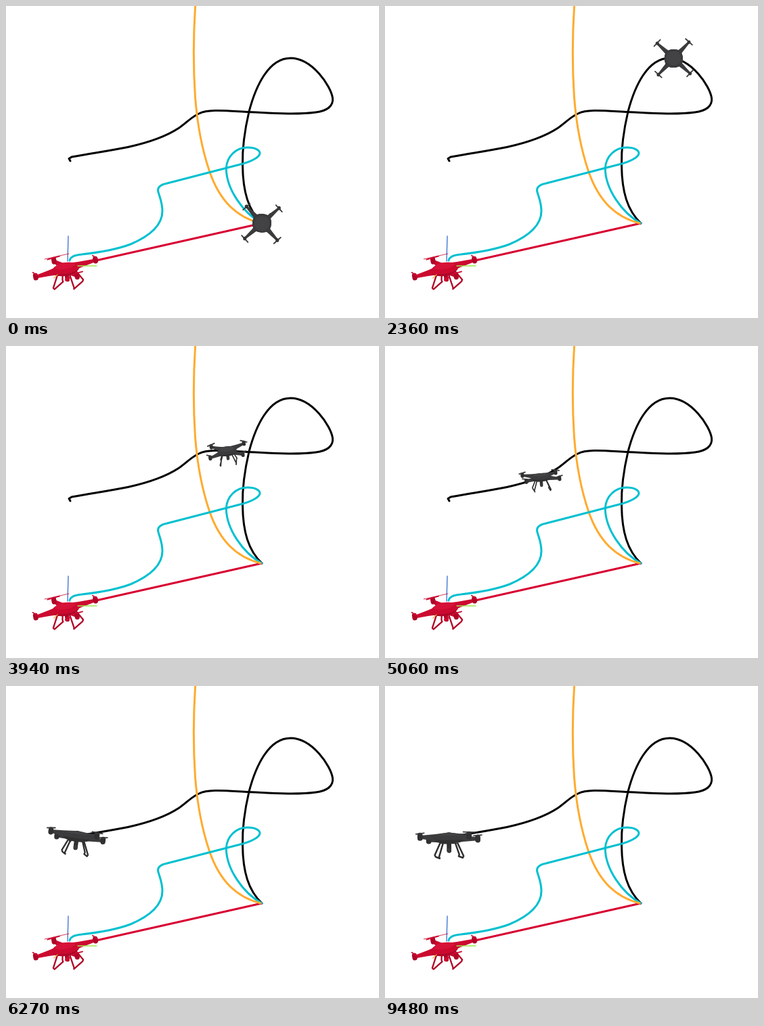
An HTML page with a canvas for the animation above (9.51 s loop, 551 by 461 pixels).

```html
<!DOCTYPE html>
<html lang="en">
<head>
<meta charset="utf-8">
<title>Drone flight paths</title>
<style>
  html, body { margin: 0; width: 100%; height: 100%; overflow: hidden; background: #fff; }
  canvas { display: block; width: 551px; height: 461px; }
</style>
</head>
<body>
<canvas id="stage" width="551" height="461"></canvas>
<script>
const g = document.getElementById('stage').getContext('2d');
const LOOP = 9510, RAD = Math.PI / 180;

const flight = 'M378 321C358 302 350 275 349.5 235C349 212 352 186 359 156' +
  'C369 118 388 77 420.5 77C452 77 480 118 482.5 136C484 148 474 155 458 157' +
  'C428 161 390 158 359 156.5C326 155 299 152 285 159C274 164 267 172 255 180.5' +
  'C236 193 214 201 180 208.5C150 214.5 130 217 97 223L93 225.5L95 229';
const black = new Path2D(flight);
const orange = new Path2D('M279.6 0C277 40 276.5 90 279.5 135C283 180 290 213 300.5 244C316 289 341 312 376 321');
const red = new Path2D('M120 379L378 321');
const tealTail = new Path2D('M378 321C350 306 325.500 270 325.300 240');
const tealFront = new Path2D('M325.300 240C326 222 340 209 357 209C368 209 375 213 375 217.5' +
  'C375 223 364 229 350 233L238 262C228 264 223 268 225 275' +
  'C227 282 231 291 231 303C231 328 205 343 184 352C160 361 130 365 112 367C100 368 95 371 94 376');

const line = document.createElementNS('http://www.w3.org/2000/svg', 'path');
line.setAttribute('d', flight);

// time, distance flown, yaw, view elevation, roll (degrees), arm length
const keys = [
  [1360, 0, 48, 100, 0, 34],
  [1790, 106, 33, 105, 0, 32],
  [2315, 277, 42, 85, 0, 33],
  [3030, 382, 61, 38, -12, 36],
  [4255, 581, 45, 16, -6, 34],
  [5060, 646, 39, 11, -4, 35],
  [6270, 775, 37, 5, 7, 49],
  [7100, 786, 35, 4, -1, 52]
];

// monotone cubic interpolation, at rest at both ends
function slope(i, c) {
  if (i === 0 || i === keys.length - 1) return 0;
  const rate = j => (keys[j + 1][c] - keys[j][c]) / (keys[j + 1][0] - keys[j][0]);
  const a = rate(i - 1), b = rate(i);
  return a * b <= 0 ? 0 : 2 * a * b / (a + b);
}

function poseAt(t) {
  const i = Math.max(0, keys.findLastIndex((k, n) => k[0] <= t && n < keys.length - 1));
  const p = keys[i], q = keys[i + 1], h = q[0] - p[0];
  const u = Math.min(1, Math.max(0, (t - p[0]) / h)), w = 1 - u;
  return p.map((v, c) =>
    v * (1 + 2 * u) * w * w + slope(i, c) * h * u * w * w +
    q[c] * u * u * (3 - 2 * u) - slope(i + 1, c) * h * u * u * w).slice(1);
}

function stroke(path, color) {
  g.strokeStyle = color;
  g.lineWidth = 3;
  g.stroke(path);
}

function poly(points, color, width) {
  g.strokeStyle = color;
  g.lineWidth = width;
  g.beginPath();
  points.forEach(p => g.lineTo(p[0], p[1]));
  g.stroke();
}

function arm([x, y], size, color) {
  const len = Math.hypot(x, y) || 1, nx = -y / len * size, ny = x / len * size;
  const side = (k, s) => [x * k + nx * s, y * k + ny * s];
  g.fillStyle = color;
  g.beginPath();
  g.moveTo(...side(0, 0.16));
  g.quadraticCurveTo(...side(0.5, 0.08), ...side(1, 0.045));
  g.lineTo(...side(1, -0.045));
  g.quadraticCurveTo(...side(0.5, -0.08), ...side(0, -0.16));
  g.fill();
}

function drone(x, y, [yaw, tilt, roll, size], [dark, base, light]) {
  const sin = Math.sin(tilt * RAD), cos = Math.cos(tilt * RAD);
  // point at quarter turn i, radius r (in arm lengths), depth z below the arms
  const at = (i, r, z = 0) => {
    const a = (yaw + i * 90) * RAD;
    return [r * Math.cos(a) * size, (r * Math.sin(a) * sin + z * cos) * size];
  };
  const corners = [0, 1, 2, 3];
  g.save();
  g.translate(x, y);
  g.rotate(roll * RAD);

  for (const [a, b] of [[1, 2], [0, 3]]) {
    poly([at(a, 0.3, 0.14), at(a, 0.5, 0.5), at(a, 0.47, 0.55),
      at(b, 0.47, 0.55), at(b, 0.5, 0.5), at(b, 0.3, 0.14)], dark, size * 0.048);
  }
  poly([at(0, 0, 0.15), at(0, 0, 0.36)], dark, size * 0.13);
  poly([at(0.5, 0.07, 0.34), at(2.5, 0.07, 0.34)], base, size * 0.1);

  for (const i of corners) {
    const [hx, hy] = at(i, 1, -0.1), [bx, by] = at(i + 1, 0.2);
    arm(at(i, 1), size, base);
    poly([at(i, 1, -0.05), at(i, 1, 0.03)], dark, size * 0.15);
    poly([[hx - bx, hy - by], [hx + bx, hy + by]], base, 1.8);
  }

  // rounded hull, stacked from the belly to the roof
  for (let z = 0.15; z > -0.13; z -= 0.03) {
    const r = 0.58 * Math.sqrt(1 - ((z - 0.02) / 0.17) ** 2);
    g.fillStyle = z > 0.05 ? dark : z > -0.07 ? base : light;
    g.beginPath();
    g.moveTo(...at(-0.5, r * 0.71, z));
    for (const i of corners) g.quadraticCurveTo(...at(i, r, z), ...at(i + 0.5, r * 0.71, z));
    g.fill();
  }
  g.restore();
}

const grey = ['#303031', '#3b3b3d', '#434345'];
const crimson = ['#b00628', '#cc0a30', '#d61238'];
const parked = [72, 18, -10, 48];

function draw() {
  const t = (performance.now() - start) % LOOP;
  g.fillStyle = '#fff';
  g.fillRect(0, 0, 551, 461);
  g.lineCap = g.lineJoin = 'round';

  stroke(black, '#000');
  stroke(red, '#d80032');
  stroke(tealTail, '#00c0d0');
  stroke(orange, '#ffab2e');

  const [distance, ...pose] = poseAt(t);
  const p = line.getPointAtLength(distance);
  drone(p.x, p.y, pose, grey);

  stroke(tealFront, '#00c0d0');
  poly([[92, 340], [91, 377]], '#3a6fd0', 1.3);
  drone(88, 388, parked, crimson);
  poly([[57, 374], [93, 366]], crimson[1], 0.8);
  poly([[106, 384], [134, 384]], '#9bea4c', 1.4);
  poly([[71, 402], [76, 397]], '#ffab2e', 1.2);
  requestAnimationFrame(draw);
}

const start = performance.now();
draw();
</script>
</body>
</html>
```
